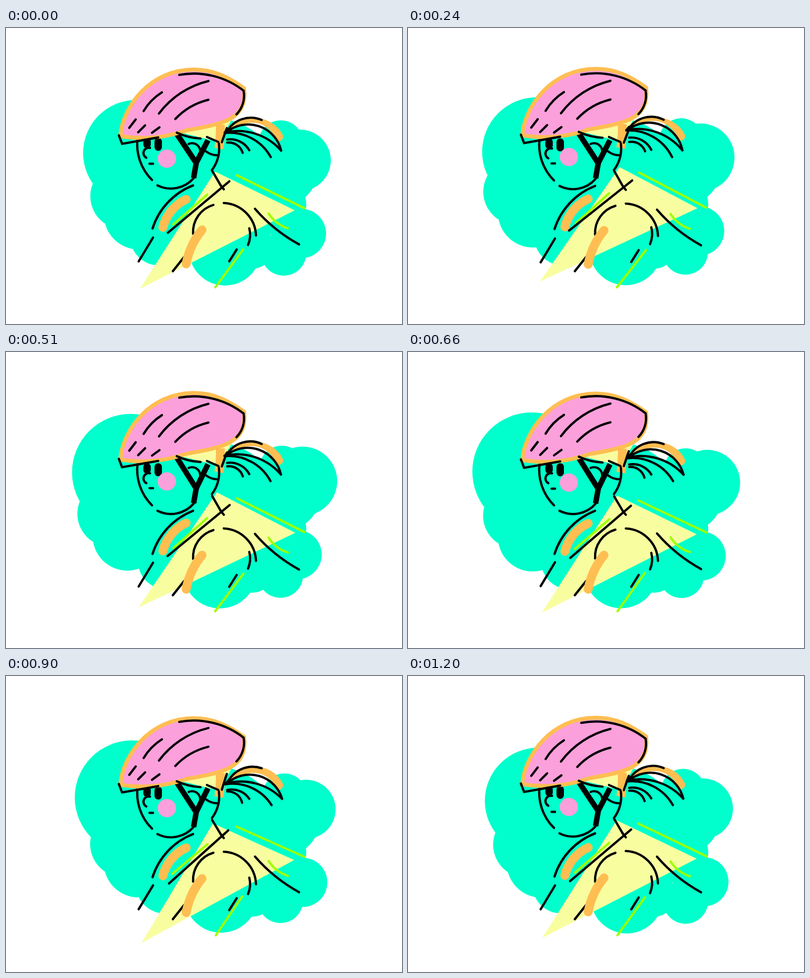
An HTML page with a canvas for the animation above (1.23 s loop, 800x600 px).

```html
<!DOCTYPE html>
<html lang="en">
<head>
<meta charset="utf-8">
<title>Cyclist</title>
<style>
  html, body { margin: 0; width: 100%; height: 100%; overflow: hidden; background: #fff; }
  canvas { display: block; }
</style>
</head>
<body>
<canvas id="stage" width="800" height="600"></canvas>
<script>
const ctx = document.getElementById('stage').getContext('2d');
const LOOP = 1230, STEP = 30;
const INK = '#000', MINT = '#00ffcc', LEMON = '#f8fea0';
const PINK = '#fca0dc', ORANGE = '#ffbe52', LIME = '#9cff00';

// Cosine that peaks at the given moment of the loop
const wave = (t, peak) => Math.cos((t - peak) / LOOP * 2 * Math.PI);

function disc(x, y, r, color = MINT) {
  ctx.fillStyle = color;
  ctx.beginPath();
  ctx.arc(x, y, r, 0, 2 * Math.PI);
  ctx.fill();
}

function polygon(points, color) {
  ctx.fillStyle = color;
  ctx.beginPath();
  points.forEach(([x, y]) => ctx.lineTo(x, y));
  ctx.fill();
}

// Circular arc between two points. Its end tangents meet at a distance
// of bend * chord to the side of the chord; zero gives a straight line.
function bow(x1, y1, x2, y2, bend = 0, color = INK, width = 4.6, cap = 'round') {
  const dx = x2 - x1, dy = y2 - y1;
  ctx.beginPath();
  ctx.moveTo(x1, y1);
  if (bend) {
    const r = Math.hypot(dx, dy) * Math.hypot(.5, bend) / Math.abs(2 * bend);
    ctx.arcTo((x1 + x2) / 2 - bend * dy, (y1 + y2) / 2 + bend * dx, x2, y2, r);
  }
  ctx.lineTo(x2, y2);
  ctx.strokeStyle = color;
  ctx.lineWidth = width;
  ctx.lineCap = cap;
  ctx.stroke();
}

function shifted(dy, draw) {
  ctx.save();
  ctx.translate(0, dy);
  draw();
  ctx.restore();
}

function drawCloud(t) {
  const swell = wave(t, 40), left = wave(t, 1068);
  const right = wave(t, 1015), tuft = wave(t, 832);
  const big = 113.7 - 6.3 * swell, upper = 65 - 6 * right;
  disc(415, 330, 148);
  disc(143 + 13 * swell + big, 248 + 5.5 * swell, big);
  disc(226.5 + 16 * left, 335.5 + 8 * left, 67);
  disc(258.5 + 14 * left, 376.5 + 3.5 * left, 70);
  disc(317 - 9 * swell, 424, 57);
  disc(436.5 + 6 * swell, 446.7 + 2.3 * swell, 74 - swell);
  disc(497, 444, 44);
  disc(557 + 4.5 * wave(t, 90), 454.7 + 2 * wave(t, 1150), 45.5);
  disc(593.5 + 6.8 * right, 414.5 + 4.5 * right, 50);
  disc(545, 358, 61.5);
  disc(562 - 3 * swell, 291 + 3 * tuft, 70);
  disc(663.5 - 7.5 * swell - upper, 266 + 5 * right, upper);
  disc(557.5 + 5.5 * tuft, 235.5 + 7.5 * tuft, 45);
}

function drawBody({ bob, sway, lean, swing }) {
  polygon([[423 - 5 * lean, 290 + 9 * lean], [583.5 - 1.5 * lean, 369 + 4.2 * lean],
    [270 + 4 * lean, 527 + 14.5 * lean]], LEMON);

  shifted(1.5 * bob, () => {
    bow(378, 320.5, 296, 408, .24);
    bow(440, 356.3, 505, 422, -.46);
    bow(466, 450.5, 451, 474.5);
  });
  shifted(1.6 * sway, () => {
    bow(503, 367.3, 592, 439.5, .09);
    bow(297, 425.7, 268, 474);
    bow(419, 359.5, 378, 418, .4);
  });
  bow(491.5, 406.3 + 2.5 * swing, 489, 440 + 2 * swing, -.17);
  bow(360, 464, 337, 493);
  shifted(lean, () => bow(364, 347.3, 317, 404, .24, ORANGE, 18));
  shifted(1.4 * bob, () => bow(396, 410.5, 364, 479.5, .13, ORANGE, 18));

  bow(406.5 + .5 * swing, 338 + 3 * swing, 337.5 - 1.5 * swing, 398.5 + 2.5 * swing, 0, LIME);
  bow(451 - 2 * swing, 311 + 2 * swing, 327.3 + 2 * swing, 415.5 + 5 * swing);
  bow(466 - swing, 299 + 6 * swing, 603 + swing, 365.5 + 1.5 * swing, 0, LIME);
  bow(479 - 2 * swing, 448.5 - 1.5 * swing, 423 + swing, 525.5, 0, LIME);
  bow(530.5, 376 - swing, 569.5, 406 - swing, .18, LIME);
}

function drawPonytail(s) {
  const x = 446 + s, y = 211.5 + 6 * s;
  const tipX = 556 + 1.7 * s, tipY = 248.5 + .5 * s;

  ctx.fillStyle = ORANGE;
  ctx.beginPath();
  ctx.moveTo(x, y);
  ctx.quadraticCurveTo(474, 169.5 + 2 * s, 517, 184 + s);
  ctx.quadraticCurveTo(549, 193 + s, 560, 219 + s);
  ctx.quadraticCurveTo(560, 230 + s, 549, 229 + s);
  ctx.quadraticCurveTo(515, 166 + 4 * s, x, y);
  ctx.fill();

  bow(x, y, 516.5, 186.5 + .5 * s, -.46);
  bow(x, y, tipX, tipY, -.8);
  bow(x - 4, y + 1, tipX, tipY, -.3);
  bow(x - 4, y + 2, 535 + 1.5 * s, 261.7, -.33);
  bow(447, 226.5 + 4.5 * s, 491.5, 248 + s, -.34);
  bow(447, 232.5 + 1.5 * s, 478 - s, 253.5 + 3.5 * s, -.42);
  bow(436, 231.5 - s, 446, 202.5 - 4 * s);
  bow(x - 1, y, x + 2, y - 4, 0, INK, 7);
}

function drawHead({ bob, tilt, lean, swing }) {
  shifted(lean, () => {
    polygon([[345, 210], [425, 190], [457, 184], [438, 217], [430, 231]], LEMON);
    bow(433, 196, 430, 244, -.04, ORANGE, 18);
  });
  drawPonytail(swing);

  shifted(1.5 * bob, () => {
    bow(266, 223.5, 295, 309.5, .25);
    bow(306, 320.5, 379, 306, .39);
    bow(285, 231.5, 285, 238, 0, INK, 15);
    bow(307.5, 231.5, 307.5, 243, 0, INK, 15);
    bow(291, 244.5, 283.5, 264.5, 4);
    bow(416.5, 291 + swing, 434, 321);
    bow(434, 321, 440, 328.5);
  });
  bow(430, 234, 416, 288, -.2);
  bow(404, 250, 428, 258, .18);
  bow(369, 235, 390, 259, -1.6);
  shifted(lean + tilt, () => bow(290, 276, 297, 276));
  disc(325, 264.5 + 3.5 * lean, 18.5, PINK);

  const knot = 275.5 + 2 * tilt;
  bow(344, 213 + lean, 385, knot + 1, 0, INK, 11, 'butt');
  bow(408, 227.5, 384, knot, 0, INK, 11, 'butt');
  bow(385, knot - 4, 379, 305.5 + 1.5 * tilt, 0, INK, 11, 'butt');
  bow(406, 221, 429, 231);
}

function drawHelmet({ tilt, lean }) {
  shifted(1.5 * lean, () => {
    ctx.beginPath();
    ctx.moveTo(231, 219);
    ctx.bezierCurveTo(236, 159, 290, 84, 380, 84);
    ctx.bezierCurveTo(420, 84, 450, 100, 481, 122);
    ctx.bezierCurveTo(488, 185, 440, 194, 365, 207);
    ctx.quadraticCurveTo(300, 230, 231, 219);
    ctx.closePath();
    ctx.fillStyle = PINK;
    ctx.fill();
    ctx.strokeStyle = ORANGE;
    ctx.lineWidth = 8;
    ctx.lineJoin = 'round';
    ctx.stroke();

    bow(228, 217.5, 234.5, 234.5);
    bow(234.5, 234.5, 307.5, 221.7);
    bow(345, 212, 393, 223.8, .1);
  });
  shifted(-1.5 * tilt, () => {
    bow(350, 93.6, 480, 125.7, -.225);
    bow(480, 125.7, 465.5, 173.7, -.26);
    bow(278, 167, 315, 129, -.12);
    bow(309, 172, 409, 106, -.18);
    bow(342, 183, 409, 144, -.15);
    bow(262, 184, 249, 201);
    bow(281, 196, 267, 210);
    bow(310, 200, 295, 211);
  });
}

function frame(now) {
  const t = Math.floor(now % LOOP / STEP) * STEP;
  const pose = {
    sway: wave(t, 420),
    bob: wave(t, 590),
    tilt: wave(t, 675),
    swing: wave(t, 900),
    lean: wave(t, 947),
  };
  ctx.fillStyle = '#fff';
  ctx.fillRect(0, 0, 800, 600);
  drawCloud(t);
  drawBody(pose);
  drawHead(pose);
  drawHelmet(pose);
}

const start = performance.now();
function tick() {
  frame(performance.now() - start);
  requestAnimationFrame(tick);
}
tick();
</script>
</body>
</html>
```
